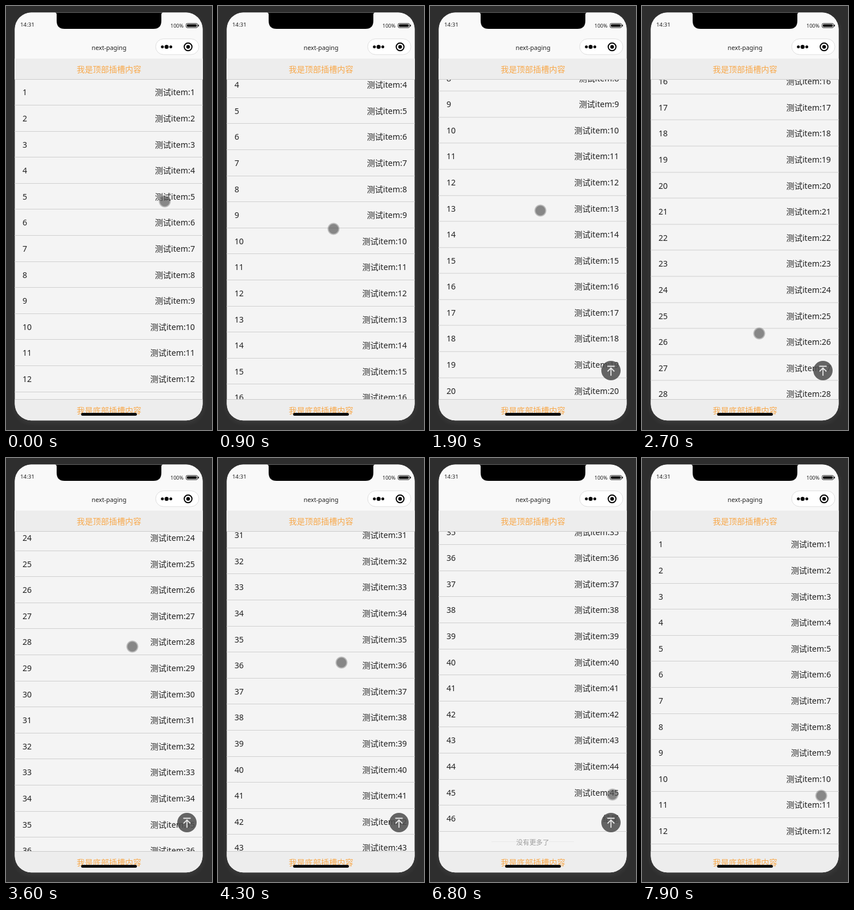
Recreate the animation shown at these times as an HTML page. Size 362 by 742 pixels, loop 8 s.

```html
<!DOCTYPE html>
<html lang="zh-CN">
<head>
<meta charset="utf-8">
<title>next-paging</title>
<style>
  html, body { margin: 0; width: 100%; height: 100%; overflow: hidden; background: #2e2e2e; }
  body { position: relative; font: 14.2px "Noto Sans", "Noto Sans CJK SC", "Noto Sans CJK", sans-serif; color: #222; }
  body * { box-sizing: border-box; }
  .phone {
    position: absolute; left: 15px; top: 11px; width: 331px; height: 715px;
    background: #f4f4f4; clip-path: inset(.5px .5px .7px .5px round 29px);
  }
  .glow { position: absolute; left: 16px; top: 12px; width: 330px; height: 713px; border-radius: 29px; box-shadow: 0 4px 11px rgba(255, 255, 255, .08); }
  .nav { position: absolute; left: 0; top: 0; width: 100%; height: 81px; background: #f9f9f9; }
  .nav svg { position: absolute; left: 1px; top: 1px; overflow: visible; }
  .nav span { position: absolute; line-height: 16px; white-space: nowrap; }
  .clock { left: 10px; top: 14px; font-size: 9.8px; }
  .charge { right: 34px; top: 16px; font-size: 9px; }
  .title { left: 1px; width: 330px; top: 54px; text-align: center; font-size: 10.8px; }
  .slot { position: absolute; left: 0; width: 100%; height: 37px; padding-left: 1px; background: #ededed; color: #f8a94c; text-align: center; line-height: 37px; }
  .head { top: 81px; border-bottom: 1px solid #cbcbcb; }
  .foot { top: 676.5px; height: 39px; border-top: 1px solid #cbcbcb; }
  .home { position: absolute; left: 117px; top: 701.4px; width: 98px; height: 5px; border-radius: 3px; background: #0c0c0c; }
  .view { position: absolute; left: 0; top: 117.4px; width: 100%; height: 560px; overflow: hidden; }
  .row {
    display: flex; justify-content: space-between; height: 45.6px; padding: 0 14px;
    line-height: 46.2px; border-bottom: 1px solid #cfcfcf;
  }
  .end { display: flex; align-items: center; justify-content: center; height: 34px; padding-top: 2px; font-size: 11.6px; color: #9b9b9b; }
  .end::before, .end::after { content: ""; width: 44px; height: 1px; background: #e9e9e9; }
  .list, .top, .cursor { animation: 8s steps(1) -10ms infinite; }
  .list { animation-name: scroll; }
  .top { position: absolute; left: 301px; top: 620.5px; animation-name: show; }
  .cursor {
    position: absolute; left: -11px; top: -11px; width: 22px; height: 22px; border-radius: 50%;
    background: radial-gradient(circle, rgba(80, 80, 80, .67) 8px, rgba(60, 60, 60, .34) 9px, rgba(60, 60, 60, .28) 10px, transparent 11px);
    animation-name: point;
  }
  @keyframes show {
    0% { visibility: hidden; }
    21.25% { visibility: visible; }
    92.5%, 100% { visibility: hidden; }
  }
  @keyframes scroll {
    0% { transform: translateY(0); }
    5% { transform: translateY(0); animation-timing-function: steps(5); }
    11.25% { transform: translateY(-150px); animation-timing-function: steps(4); }
    16.25% { transform: translateY(-234.9px); animation-timing-function: steps(6); }
    23.75% { transform: translateY(-343.7px); }
    25% { transform: translateY(-355px); animation-timing-function: steps(4); }
    30% { transform: translateY(-600px); animation-timing-function: steps(3); }
    33.75% { transform: translateY(-703.4px); animation-timing-function: steps(2); }
    36.25% { transform: translateY(-735px); }
    37.5% { transform: translateY(-742px); animation-timing-function: steps(4); }
    42.5% { transform: translateY(-1020px); animation-timing-function: steps(2); }
    45% { transform: translateY(-1060px); }
    46.25% { transform: translateY(-1060px); animation-timing-function: steps(6); }
    53.75% { transform: translateY(-1384px); animation-timing-function: steps(3); }
    57.5% { transform: translateY(-1460px); animation-timing-function: steps(2); }
    60% { transform: translateY(-1495px); animation-timing-function: steps(5); }
    66.25%, 88.75% { transform: translateY(-1572px); }
    90% { transform: translateY(-1250px); }
    91.25% { transform: translateY(-400px); }
    92.5%, 100% { transform: translateY(0); }
  }
  @keyframes point {
    0% { transform: translate(279px, 342px); animation-timing-function: steps(5); }
    6.25% { transform: translate(215px, 560px); animation-timing-function: steps(4); }
    11.25% { transform: translate(203px, 390px); animation-timing-function: steps(4); }
    16.25% { transform: translate(201px, 334px); animation-timing-function: steps(3); }
    20% { transform: translate(203px, 490px); animation-timing-function: steps(3); }
    23.75% { transform: translate(194px, 358px); animation-timing-function: steps(2); }
    26.25% { transform: translate(200px, 500px); animation-timing-function: steps(3); }
    30% { transform: translate(198px, 270px); animation-timing-function: steps(3); }
    33.75% { transform: translate(206px, 573px); animation-timing-function: steps(2); }
    36.25% { transform: translate(213px, 701px); animation-timing-function: steps(4); }
    41.25% { transform: translate(225px, 123px); animation-timing-function: steps(3); }
    45% { transform: translate(222px, 330px); }
    46.25% { transform: translate(222px, 330px); animation-timing-function: steps(3); }
    50% { transform: translate(215px, 590px); animation-timing-function: steps(3); }
    53.75% { transform: translate(217px, 358px); animation-timing-function: steps(3); }
    57.5% { transform: translate(214px, 280px); animation-timing-function: steps(3); }
    61.25% { transform: translate(210px, 590px); animation-timing-function: steps(3); }
    65% { transform: translate(212px, 310px); animation-timing-function: steps(3); }
    68.75% { transform: translate(206px, 600px); }
    70% { transform: translate(203px, 699px); }
    71.25% { transform: translate(210px, 485px); animation-timing-function: steps(2); }
    73.75% { transform: translate(218px, 348px); animation-timing-function: steps(5); }
    80% { transform: translate(308px, 465px); animation-timing-function: steps(6); }
    87.5% { transform: translate(327px, 651px); }
    95% { transform: translate(327px, 651px); animation-timing-function: steps(3); }
    98.75%, 100% { transform: translate(315px, 591px); }
  }
</style>
</head>
<body>
<div class="glow"></div>
<div class="phone">
  <div class="view"><div class="list" id="list"></div></div>
  <div class="nav">
    <svg width="330" height="80">
      <path d="M70 -1Q73 0 73 3V14Q73 28 87 28H243Q257 28 257 14V3Q257 0 260 -1Z"/>
      <rect x="300.5" y="18.5" width="20" height="7.5" rx="2" fill="none" stroke="#222"/>
      <rect x="302" y="20" width="17" height="4.5" rx="1"/>
      <rect x="321.5" y="20.5" width="1.5" height="3.5" rx=".7"/>
      <rect x="247" y="45.5" width="76" height="27.5" rx="13.7" fill="#fff" stroke="#dedede"/>
      <circle cx="258.8" cy="59.5" r="2.5"/>
      <circle cx="266.2" cy="59.5" r="3.6"/>
      <circle cx="273.6" cy="59.5" r="2.5"/>
      <circle cx="304" cy="59.5" r="6.8" fill="none" stroke="#000" stroke-width="2"/>
      <circle cx="304" cy="59.5" r="3.2"/>
    </svg>
    <span class="clock">14:31</span>
    <span class="charge">100%</span>
    <span class="title">next-paging</span>
  </div>
  <div class="slot head">我是顶部插槽内容</div>
  <div class="slot foot">我是底部插槽内容</div>
  <div class="home"></div>
</div>
<svg class="top" width="34" height="34">
  <circle cx="17" cy="17" r="17" fill="#4f4f4f" fill-opacity=".87"/>
  <path d="M10.5 9.5H23.5M17 26V13M11 18.5L17 12.5L23 18.5" fill="none" stroke="#e6e6e6" stroke-width="1.8"/>
</svg>
<div class="cursor"></div>
<script>
  const last = 46;
  const row = n => `<div class="row"><span>${n}</span><span>${n < last ? "测试item:" + n : "结尾"}</span></div>`;
  document.getElementById("list").innerHTML =
    Array.from({ length: last }, (_, i) => row(i + 1)).join("") + '<div class="end">没有更多了</div>';
</script>
</body>
</html>
```
